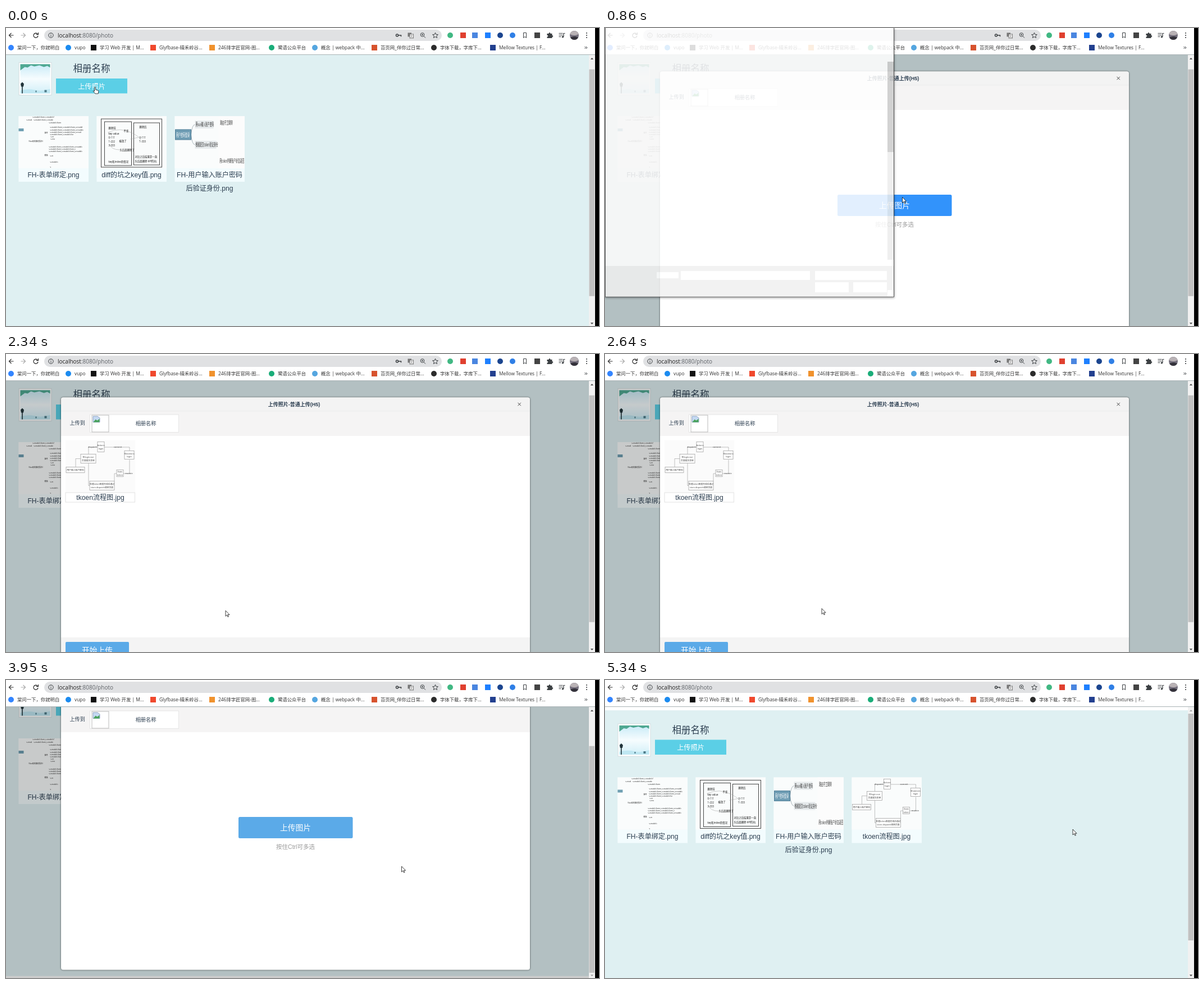
An HTML page for the animation above (5.41 s loop, 1056 by 531 pixels).

```html
<!DOCTYPE html>
<html lang="zh">
<head>
<meta charset="utf-8">
<title>相册上传</title>
<style>
html, body { margin: 0; width: 100%; height: 100%; overflow: hidden; background: #fff; }
svg { display: block; font-family: "Open Sans", "Noto Sans CJK SC", "Noto Sans CJK", sans-serif; }
.web { font-family: "Liberation Sans", "Noto Sans CJK SC", "Noto Sans CJK", sans-serif; }
.mid { text-anchor: middle; }
.end { text-anchor: end; }
.bold { font-weight: 700; }
</style>
</head>
<body>
<svg id="stage" width="1056" height="531" viewBox="0 0 1056 531"></svg>
<script>
const FRAME = 77.29, COUNT = 70, LOOP = 5410;
const INK = '#2c3e50';

// Drawing helpers; text is centred vertically on y
const R = (x, y, w, h, fill, more = '') => `<rect x="${x}" y="${y}" width="${w}" height="${h}" fill="${fill}" ${more}/>`;
const C = (x, y, r, fill, more = '') => `<circle cx="${x}" cy="${y}" r="${r}" fill="${fill}" ${more}/>`;
const P = (d, fill, more = '') => `<path d="${d}" fill="${fill}" ${more}/>`;
const L = (d, color = '#333', w = 1, more = '') => P(d, 'none', `stroke="${color}" stroke-width="${w}" ${more}`);
const T = (x, y, size, text, fill = '#222', cls = '') =>
  `<text x="${x}" y="${y + size * .37}" font-size="${size}" fill="${fill}" class="${cls}">${text}</text>`;
const G = (attrs, ...parts) => `<g ${attrs}>${parts.join('')}</g>`;
const at = (x, y, sx = 1, sy = sx) => `transform="translate(${x} ${y}) scale(${sx} ${sy})"`;
const line = (color, w = 1) => `stroke="${color}" stroke-width="${w}"`;
const chevron = (x, y, color = '#555') => L(`M${x - 2.5} ${y - 1.2}l2.5 2.5 2.5-2.5`, color, .9);
const next = (x, y) => L(`M${x} ${y - 2}l2 2-2 2`, '#555', .8);
const tri = (x, y, up, fill) => P(`M${x - 2.6} ${y + (up ? 1.5 : -1.5)}h5.2l-2.6 ${up ? -3 : 3}z`, fill);

/* ---------- pictures on the page ---------- */
function cover() {
  return G(at(22.5, 78), R(.5, 0, 58, 58, '#fff', line('#d3dde0')),
    R(3, 3, 53, 52, 'url(#sky)'),
    P('M3 3h53v6l-5-3-6 2-8-3-9 2-6-2-6 4-5-1-8 6z', '#4fa892'),
    P('M3 50q14-4 26-1t27-2v8H3z', '#bfe7f2'),
    R(5.7, 42, 1.6, 13, '#22343a'), P('M3.5 38l3-3 3 3-1 5h-4z', '#22343a'),
    R(30, 50, 2, 3, '#4d7a88'), R(46, 49, 4, 4, '#4d7a88'));
}

function codeShot() {
  const rows = [[25, 2, 22], [14, 7, 5], [27, 7, 19], [54, 12, 12], [56, 20, 33], [56, 25, 34], [56, 29, 31], [56, 33, 24],
    [57, 37, 3], [57, 41, 4], [54, 55, 34], [54, 59, 27], [54, 63, 34], [56, 71, 3], [56, 82, 8], [56, 91, 1]];
  return rows.map(([x, y, n]) => T(x, y, 3.3, 'v-model=form,'.repeat(3).slice(0, n), '#222')).join('') +
    R(0, 22, 9, 5, '#6f9fb2') + T(46, 30, 3, '事件', '#111') + T(18, 45, 3, '(Vue双向绑定指令)', '#111') + T(46, 70, 3, '修饰', '#111');
}

function diffShot() {
  const notes = [[21, 21, '删除前'], [48, 26, '不变'], [21, 31, 'key value'], [21, 38, '0-111'], [21, 45, '1-222'],
    [21, 52, '3-333'], [40, 44, '被改了'], [76, 19, '删除后'], [76, 38, '0-111'], [76, 45, '1-333'], [41, 60, '头后面删除了'],
    [68, 72, '对比之后结果是一直'], [68, 80, '头后面删除 diff的坑'], [21, 81, 'key和index的情况']];
  return R(8, 5, 108, 86, 'none', line('#333', .9)) + R(14, 10, 48, 78, 'none', line('#333', .9)) +
    R(66, 12, 46, 75, 'none', line('#333', .9)) + L('M20 29q22-10 43 1t12 14M23 50q3 10 18 10M60 41l14-3', '#999', .5) +
    notes.map(([x, y, t]) => T(x, y, 4.4, t, '#111')).join('');
}

function mindShot() {
  const tag = (x, y, t) => T(x, y, 9, t, '#333');
  return R(78, 0, 46, 93, '#fcfcfc') + R(36, 8, 33, 14, '#e6eaec') + R(36, 44, 38, 14, '#e6eaec') +
    L('M29 33q2-18 7-18M29 33q2 18 7 18', '#8b9aa2', .7) + R(1, 24, 28, 18, '#6f9db4', line('#4d7d96')) +
    G('transform="scale(.42 1)"', T(6, 33, 9.5, '用户密码登录', '#fff'), tag(88, 15, '用vue输入账户密码'),
      tag(88, 51, '根据提交token验证身份'), tag(192, 12, '路由守卫跳转'), tag(190, 80, '用token判断账户状态返回'));
}

function flowShot() {
  const box = (x, y, w, h, ...rows) => R(x, y, w, h, '#fdfdfd', line('#999', .7)) +
    rows.map((t, i) => T(x + w / 2, y + h / 2 + (i - (rows.length - 1) / 2) * 5.2, 3.8, t, '#444', 'mid')).join('');
  return L('M41 25V12.5H57M69 12.5H114V19M114 35V59.5H103M91 59.5H87V73M43 81H41V41M18 48V33H27', '#999', .6) +
    box(57, 3, 12, 18, 'Actions', 'login') + box(105, 19, 17, 15, 'Mutations', 'login') +
    box(27, 25, 27, 16, '在login.vue', '页面提交表单') + box(1, 48, 33, 10, '用户输入账户密码') +
    box(91, 53, 12, 12, 'State', 'token') + box(43, 73, 44, 16, '处理token数据完成后通过', 'store.dispatch跳转页面') +
    T(48, 12.5, 4, 'dispatch', '#444', 'mid') + T(93, 12.5, 4, 'commit', '#444', 'mid') + T(113, 59.5, 4, 'mutate', '#444', 'mid');
}

const card = (i, shot, ...names) => G(at(22.5 + i * 139, 173.5), R(0, 0, 124.5, 117, '#f3fcfe'), R(0, 0, 124.5, 93, '#fafcfc'), shot,
  names.map((t, k) => T(62, 105 + k * 24, 12.1, t, INK, 'web mid')).join(''));

function page() {
  return R(0, 0, 1038, 700, '#fff') + R(0, 54, 1038, 543, '#dff0f2') + cover() +
    T(152.5, 88.8, 16.5, '相册名称', INK, 'web mid') +
    R(89, 106.5, 127, 26.5, '#5bcfe6') + T(152.5, 120.5, 12.2, '上传照片', '#fff', 'web mid') +
    card(0, codeShot(), 'FH-表单绑定.png') + card(1, diffShot(), 'diff的坑之key值.png') +
    card(2, mindShot(), 'FH-用户输入账户密码', '后验证身份.png') +
    G('id="added"', card(3, flowShot(), 'tkoen流程图.jpg'));
}

function dialog() {
  return R(98, 94, 835, 492, '#fff', 'rx="4" style="filter:drop-shadow(0 0 1.5px #000a)"') +
    P('M98 118V98q0-4 4-4h827q4 0 4 4v20z', '#f3f3f3') + R(98, 118, 835, 44.5, '#f5f4f4') +
    L('M98 118.3H933', '#e8e8e8', .8) +
    T(513, 106, 9, '上传照片-普通上传(H5)', INK, 'web mid bold') + L('M911.5 103.3l5.4 5.4m0-5.4l-5.4 5.4', '#444', 1) +
    T(113.5, 139.5, 9.1, '上传到', INK, 'web') + R(149.5, 124.5, 158, 31.5, '#fff', line('#e6e6e6')) +
    R(153, 125.5, 30, 30, '#fff', line('#bbb')) +
    P('M155 127.5h8l4 3v7.5h-12z', '#c5d9f3', line('#8fa6c4')) + P('M155.5 138l4-5 3 2 4-3v6z', '#4aa35c') +
    T(249, 140, 9.2, '相册名称', INK, 'web mid') +
    G('id="pick"', R(414, 313.5, 203.5, 38, '#5baae8', 'rx="2.5" id="pickBtn"'),
      T(515.5, 332, 13.7, '上传图片', '#fff', 'web mid'), T(515.5, 366.3, 10.5, '按住Ctrl可多选', '#999', 'web mid')) +
    G('id="list"', G(at(106, 170), R(0, 0, 124, 93, '#fbfbfb'), flowShot(), R(0, 93.5, 123.5, 17, '#fff', line('#e2e2e2')),
      T(62, 102.5, 12.1, 'tkoen流程图.jpg', INK, 'web mid')),
      P('M98 521.5h835v60q0 4-4 4h-827q-4 0-4-4z', '#f4f4f4'),
      R(106, 529.5, 113, 30, '#5baae8', 'rx="2" id="sendBtn"'), T(162.5, 544.5, 13.7, '开始上传', '#fff', 'web mid'));
}

/* ---------- browser ---------- */
function chrome() {
  const marks = [[9, '棠问一下，你就明白', '#3385ff', 1], [111, 'vupo', '#1b8bf0', 1], [156, '学习 Web 开发 | M...', '#111', 0],
    [262, 'Glyfbase-晴禾岭谷...', '#f0492e', 0], [367, '246排字匠官网-图...', '#f0922e', 0], [473, '鹭语公众平台', '#1aad79', 1],
    [550, '概念 | webpack 中...', '#55a6e0', 1], [656, '苔页网_伴你过日常...', '#d7532e', 0], [762, '字体下载，字库下...', '#2b2b2b', 1],
    [867, 'Mellow Textures | F...', '#23408f', 0]];
  const logo = (x, y, r, fill, round) => round ? C(x, y, r, fill) : R(x - r, y - r, 2 * r, 2 * r, fill);
  const exts = [[791, '#41b883', 1], [814, '#e0402f', 0], [835, '#4a86e0', 0], [858, '#1e80ff', 0], [880, '#1b458f', 1], [902, '#2f7fe6', 1], [946, '#444', 0]];
  const dark = '#3c4043';
  return R(0, 0, 1049, 48, '#fff') + R(0, 47, 1049, 1, '#a9b3b5') + R(68, 3, 708, 20, '#e0e1e3', 'rx="10"') +
    L('M13.5 13H5.5m4-4l-4 4 4 4', '#333', 1.2) + L('M26.5 13h8m-4-4l4 4-4 4', '#aaa', 1.2) +
    L('M56 10.5a4 4 0 1 0 1 3.5M57.5 8v3.5h-3.5', '#333', 1.3) +
    C(80, 13, 4.2, 'none', line(dark)) + L('M80 12.5v3M80 10.2v1.2', dark, 1) +
    T(92, 13, 10, 'localhost<tspan fill="#5f6368">:8080/photo</tspan>') +
    C(696.5, 13, 2, 'none', line(dark, 1.5)) + L('M698.5 13h5v2.2', dark, 1.5) +
    R(715.5, 8.5, 6.5, 7, '#777') + R(719, 11, 6.5, 7, '#fff', line('#777')) + T(722.2, 14.5, 5, '文', '#666', 'mid') +
    C(741.5, 12, 3.3, 'none', line(dark)) + L('M744 14.5l3 3M740 12h3M741.5 10.5v3', dark, 1) +
    P('M764.5 8.3l1.4 3.2 3.5.3-2.7 2.3.9 3.4-3.1-1.8-3.1 1.8.9-3.4-2.7-2.3 3.5-.3z', 'none', line(dark)) +
    exts.map(([x, c, round]) => logo(x, 13, 5, c, round)).join('') +
    L('M921.5 8.5h5v9l-2.5-2-2.5 2z', dark, 1) +
    P('M963.5 10h3q0-2 1.5-2t1.5 2h3v3q1.8 0 1.8 1.5T972.5 16v2h-9v-2.5q1.8 0 1.8-1.3T963.5 13z', dark) +
    L('M984.5 9.5h7m-7 3h7m-7 3h4M993 9v6.5M993 9.5h2.5', dark, 1.2) + C(991.5, 15.7, 1.7, dark) +
    C(1012, 13, 8, '#75707e') + P('M1004.3 11a8 8 0 0 1 15.4 0q-8 4-15.4 0z', '#b9b2b5') + P('M1005 17q7-4 14 0a8 8 0 0 1-14 0z', '#34323b') +
    [9, 13, 17].map(y => C(1034, y, 1.1, dark)).join('') +
    marks.map(([x, t, c, round]) => logo(x, 35, 5, c, round) + T(x + 11, 35.3, 8.4, t, '#333')).join('') +
    L('M1030.5 33l2 2-2 2m2.5-4l2 2-2 2', dark, 1);
}

const scrollbar = () => R(1038, 48, 11, 483, '#f1f1f1') + G('id="upTri"', tri(1043.5, 54.5, true, 'currentColor')) +
  G('id="downTri"', tri(1043.5, 526.5, false, 'currentColor')) + R(1038.5, 60, 9.5, 404, '#c1c1c1', 'id="thumb"');

/* ---------- file window ---------- */
const col = i => 156 + 76.8 * i;
const label = (i, y, text) => text.split('|').map((t, k) => T(col(i), y + k * 11, 8.3, t, '#111', 'mid')).join('');
const shortcut = (x, y) => R(x, y, 11, 11, '#fff', line('#bbb', .5)) + L(`M${x + 2.5} ${y + 9}q0-5 5-5.5M${x + 5} ${y + 1.8}l3 1.7-2 3`, '#1c66b8', 1.5);

function folder(i, fill, extra) {
  return G(at(col(i) - 22, 52), P('M0 4L12 1l17 3v54L0 57z', '#f3cd62'), P('M8 7l36-2v50l-24 5z', fill, line('#ccc', .5)),
    extra, P('M0 4l9 6q7 4 7 11l2 41L0 56z', '#ffe08a'));
}

const zip = (x, y) => G(at(x, y), P('M0 3l17-3 31 4v56l-17 4L0 57z', '#ffe08a'), P('M20 2l28 3v55l-17 4z', '#f9d674'),
  R(27, 2, 6, 60, '#a8a8a8'), L('M30 3v58', '#666', 3, 'stroke-dasharray="1.5 1.5"'));

const mini = (x, y, w, h) => G(at(x, y), R(0, 0, w, h, '#fff', line('#ccc', .7)), G(at(0, 0, w / 124, h / 93), flowShot()));

function files() {
  const names = [[0, 122, 'vue'], [1, 122, '笔记'], [2, 122, '家常味代码'], [3, 122, '面试'], [4, 122, '2020-12-19-vue|06.zip'],
    [0, 217, '2020-13-vue01.z|ip'], [1, 217, 'Orvex|Shadebench|Vintage KT'], [2, 217, 'Orvex|Inkforge KT|2019'],
    [3, 217, 'FH-用户输入账户|密码后验证身份.|png'], [4, 217, 'NCrafter Q'], [0, 323, 'Halvoryne Brim'], [1, 323, 'Deskio'],
    [2, 323, 'tkoen流程图.jpg'], [3, 323, 'toke问题图.jpg'], [4, 323, 'vue.md'], [0, 407, 'KLQ 校园版'], [1, 407, 'VTwig 8 Update|4'],
    [2, 407, 'xx1aaa.gif'], [3, 407, '乐映禾'], [4, 407, '棠问网盘']];
  const apps = [[200, 143.5, 65, '#0b2230', 0], [277, 143.5, 65, '#001d2b', 0], [121.5, 248.5, 69, '#0078d7', 0], [198, 248.5, 69, '#404040', 0],
    [125, 334, 63, '#5b8def', 13], [200.5, 335, 64.5, '#e8262f', 5], [352, 333, 69, '#10c20c', 12]];
  const codeLines = [8, 14, 20, 26, 32, 38, 44].map((y, k) => R(22, y + 4, 9 + k % 3 * 4, 1, '#8a93a8')).join('');
  return R(350, 141, 74, 105, '#e5f3ff', 'id="hover"') + R(273, 247.5, 74, 82.5, '#cce8ff', 'id="chosen" stroke="#99d1ff" stroke-width=".8"') +
    folder(0, '#272733', codeLines) + folder(1, '#f7f7f7', R(22, 26, 15, 15, '#777')) +
    folder(2, '#f5f6f8', R(24, 14, 15, 1.5, '#aaa') + R(31, 31, 10, 17, '#4d7fc0')) + folder(3, '#fafafa', R(20, 14, 20, 2, '#d77') + R(21, 27, 19, 9, '#e6efe8') + R(24, 40, 14, 2, '#d77')) +
    zip(441.5, 50) + zip(133.5, 145) +
    apps.map(([x, y, s, c, rx]) => R(x, y, s, s, c, `rx="${rx}"`)).join('') +
    R(429.5, 143, 68, 68, '#fff', line('#ddd')) + R(449, 160, 29, 29, '#1fa348') +
    R(430, 333, 67, 67, '#fff', 'rx="13" stroke="#eee"') + C(463.5, 367, 22, '#3d9df2') +
    [[200, 199], [277, 199], [430, 199], [122, 306], [199, 306], [122, 390], [200, 390], [353, 390], [430, 390]].map(p => shortcut(...p)).join('') +
    G(at(355, 195), R(0, 0, 63, 14, '#fff', line('#ccc', .7)), R(2, 5, 11, 3, '#6f9db4'), R(18, 3, 22, 1.5, '#aaa'), R(18, 9, 26, 1.5, '#aaa')) +
    mini(278, 283, 64, 32) + mini(355, 291, 63, 24) +
    P('M436 255l40-5 16 10 0 51-48 5z', '#fff', line('#ccc', .8)) + R(452, 272, 24, 24, '#707070', 'transform="rotate(-7 464 284)"') +
    G(at(278, 376), R(0, 0, 63, 22, '#fff', line('#ccc', .7)), R(22, 9, 14, 1, '#aaa'), R(28, 14, 9, 3, '#6cba83'), R(0, 2, 63, 1, '#ddd')) +
    names.map(n => label(...n)).join('');
}

function sidebar() {
  const rows = [[89, 'VeloStow', 'o#0a74d4'], [105.5, 'StowPad 上传', 'f'], [122, '附件', 'f'], [138.5, '图片', 'f'], [155, '文档', 'f'], [177, 'KLQ网盘', 'o#4a90e2'],
    [199.5, '此电脑', 'p'], [216, '3D 对象', 's#35a5d6'], [232, '视频', 's#555d66'], [248.5, '图片', 's#5a9ec9'], [265, '文档', 's#a5aeb5'], [281.5, '下载', 'd'],
    [298, '音乐', 'n'], [314.5, '桌面', 's#1e90dc'], [331, 'Nor10 (C:)', 'h'], [347.5, '新加卷 (D:)', 'h'], [364, '新加卷 (E:)', 'h'], [380.5, '新加卷 (F:)', 'h'],
    [397, '新加卷 (G:)', 'h'], [419, '网络', 'p']];
  const icon = {
    o: (y, c) => C(20.5, y, 4.5, c),
    f: y => R(22.5, y - 4.5, 6.5, 9, '#f7cf63') + R(27, y - 3, 2.5, 7.5, '#ffe699'),
    p: y => R(17, y - 4, 9, 6, '#3a9bdc') + R(19, y + 3, 6, 1.2, '#777'),
    s: (y, c) => R(21.5, y - 4, 10, 8, c) + R(23.5, y - 2, 6, 3.5, '#fff', 'opacity=".5"'),
    d: y => L(`M26.5 ${y - 4.5}v6`, '#2b80d0', 3) + P(`M22 ${y}h9l-4.5 5z`, '#2b80d0'),
    n: y => L(`M26 ${y + 3}v-7q1 3 3.5 3.5`, '#1e90dc', 1.4) + C(24.5, y + 3, 2, '#1e90dc'),
    h: y => R(21.5, y, 10, 3, '#8a8f94') + P(`M21.5 ${y}l2-2h6l2 2z`, '#c5c9cc')
  };
  const nested = 'fsdnh';
  return R(0, 306, 95, 16.5, '#d9d9d9') + P('M21 62l1.4 3.3 3.6.3-2.8 2.3.9 3.5-3.1-1.9-3.1 1.9.9-3.5-2.8-2.3 3.6-.3z', '#2d84d0') + T(29, 67, 8.3, '快速访问') +
    rows.map(([y, t, kind]) => icon[kind[0]](y, kind.slice(1)) + T(nested.includes(kind[0]) ? 34.5 : 29, y, 8.3, t)).join('');
}

function fileWindow() {
  const bar = (x, y, h) => R(x, 49, 11, 377, '#f0f0f0') + R(x, y, 11, h, '#cdcdcd') + L(`M${x + 3} 55l2.5-2.5 2.5 2.5M${x + 3} 418.5l2.5 2.5 2.5-2.5`, '#555', 1);
  return R(.5, -.5, 516, 482, '#fff', 'stroke="#777" style="filter:drop-shadow(0 1px 2px #0006)"') +
    L('M16.5 12.5h-8m3-3l-3 3 3 3M26 12.5h8m-3-3l3 3-3 3', '#ccc', 1) + chevron(49, 12.5, '#bbb') + L('M64 17V9m-3 3l3-3 3 3', '#555', 1.2) +
    R(70.5, 1, 270, 21, '#fff', line('#d9d9d9')) + R(341, 1, 23.5, 21, '#fff', line('#d9d9d9')) + R(370.5, 1, 139, 21, '#fff', line('#d9d9d9')) +
    R(75, 8, 10.5, 7.5, '#1e90dc') + next(90, 12) + T(98, 12, 8.5, '此电脑') + next(130, 12) + T(138, 12, 8.5, '桌面') + next(161.5, 12) +
    chevron(329.5, 12.5) + L('M355 10a3.5 3.5 0 1 0 .8 3M355.5 8v2.5h-2.5', '#444', 1) +
    C(385.5, 11, 2.7, 'none', line('#555')) + L('M383.5 13l-3 3', '#555', 1) + T(398, 12, 8.5, '搜索"桌面"', '#666') +
    R(1, 25, 515, 24, '#f5f6f7') + T(11, 37, 8.4, '组织') + tri(32.5, 37, false, '#333') + T(54.5, 37, 8.4, '新建文件夹') +
    R(433, 33, 9.5, 8, '#fff', line('#8ca0b0')) + R(435, 36, 6, 4, '#3f8fd0') + tri(452, 37, false, '#333') +
    R(470.5, 33, 9.5, 8, '#fff', line('#4a6a80')) + R(476, 33, 4, 8, '#4aa0dd') + C(500.5, 37, 5.5, '#0a64ad') + T(500.5, 37, 8, '?', '#fff', 'mid bold') +
    sidebar() + bar(95, 60, 350) + bar(505, 104, 162) + G('id="files"', files()) +
    R(1, 426, 515, 55, '#f0f0f0') + T(130, 442.5, 8.3, '文件名(N):', '#111', 'end') + R(134.5, 435, 231.5, 15.5, '#fff', line('#7a7a7a')) + chevron(361, 442.5) +
    G('id="fileName"', T(137, 442.5, 8.6, 'tkoen流程图.jpg', '#111')) +
    R(375, 435, 128.5, 15.5, '#e1e1e1', 'id="combo" stroke="#adadad"') + T(377, 442.5, 8.3, '所有文件 (*.*)', '#111') + chevron(498, 442.5) +
    R(375.7, 455.7, 58.5, 16, '#e1e1e1', line('#0078d7', 1.4)) + T(405, 464, 8.4, '打开(O)', '#111', 'mid') +
    R(444, 455.7, 59, 16, '#e1e1e1', line('#adadad')) + T(473.5, 464, 8.4, '取消', '#111', 'mid') + L('M509 480l6-6m-3 6l3-3', '#aaa', 1);
}

const ghost = () => R(.5, -.5, 514, 479.5, '#fff', 'stroke="#333" style="filter:drop-shadow(0 1px 2px #0008)"') +
  R(503, 60, 11, 353, '#ededed') + R(503, 60, 11, 161, '#ccc') + R(1, 424, 513, 54.5, '#f0f0f0') +
  R(92, 435, 39, 11, '#fff') + R(135, 433, 230, 16, '#fff') + R(374, 433, 128, 16, '#fff') + R(374, 453, 60, 18, '#fff') + R(442, 453, 60, 18, '#fff') + R(503, 467, 11, 11, '#fff');

const arrow = P('M0 0v10l2.4-2.2 1.6 3.5 1.5-.7-1.6-3.3h3.2z', '#fff', line('#111', .8));
const hand = P('M2 6V1.2q0-1.2 1-1.2t1 1.2V5l4.5 1.2q1 .4.9 1.5L8.7 12H3.5L.2 8.3q-.6-.9.1-1.3T2 8z', '#fff', line('#111', .8));

const $ = id => document.getElementById(id);
$('stage').innerHTML = `<defs>
  <linearGradient id="sky" x2="0" y2="1"><stop stop-color="#c9ebf7"/><stop offset=".5" stop-color="#f6fcfe"/><stop offset="1" stop-color="#d2eff8"/></linearGradient>
  <clipPath id="view"><rect y="48" width="1038" height="483"/></clipPath></defs>` +
  G('clip-path="url(#view)"', G('id="page"', page()), R(0, 48, 1038, 483, '#000', 'id="shade" opacity=".2"'), G('id="dialog"', dialog())) +
  scrollbar() + chrome() + R(1049, 0, 7, 531, '#000') + G('id="ghost" opacity=".86"', ghost()) + G('id="win"', fileWindow()) +
  C(0, 0, 8.5, '#ffec1a', 'id="press" opacity=".75"') + G('id="arrow"', arrow) + G('id="hand"', hand);

/* ---------- motion ---------- */
// step, x, y
const pointer = [[0, 155.5, 105], [1, 155.5, 105], [5, 529.5, 301.5], [12, 529.5, 301.5], [14, 390, 190], [16, 308, 289], [18, 308, 289],
  [21, 403, 448], [24, 403, 448], [26, 398, 461], [28, 396, 461], [32, 386, 453.5], [35, 386, 453.5], [41, 163, 470], [45, 163, 470],
  [51, 704.5, 332], [54, 790, 240], [59, 913.5, 106.5], [63, 913.5, 106.5], [69, 833, 266]];
const scroll = [[0, 16.5], [37, 16.5], [41, 69.5], [51, 69.5], [54, 0], [69, 0]];
const presses = [[1, 2], [8, 10], [16, 17], [26, 27], [43, 45], [61, 62]];

function track(keys, n) {
  const i = Math.max(1, keys.findIndex(k => k[0] >= n));
  const a = keys[i - 1], b = keys[i], p = (n - a[0]) / (b[0] - a[0]);
  return a.slice(1).map((v, k) => v + (b[k + 1] - v) * p);
}
const within = (n, a, b) => n >= a && n < b;
const show = (id, on) => $(id).setAttribute('visibility', on ? 'inherit' : 'hidden');
const move = (id, x, y) => $(id).setAttribute('transform', `translate(${x} ${y})`);
const paint = (id, fill) => $(id).setAttribute('fill', fill);

function render(n) {
  const [s] = track(scroll, n), [x, y] = track(pointer, n);
  const open = within(n, 2, 62), queued = within(n, 28, 45), pointing = n < 2 || within(n, 59, 63);
  move('page', 0, -s);
  move('dialog', 0, -s);
  move('thumb', 0, s * .83);
  $('upTri').style.color = s < 1 ? '#a3a3a3' : '#505050';
  $('downTri').style.color = s > 69 ? '#a3a3a3' : '#505050';
  show('shade', open);
  show('dialog', open);
  show('added', n >= 62);
  show('pick', !queued);
  show('list', queued);
  // a child's own visibility would override a hidden dialog, so both are combined here
  if (!open) { show('pick', false); show('list', false); }
  paint('pickBtn', within(n, 5, 28) ? '#3293fb' : '#5baae8');
  paint('sendBtn', within(n, 41, 45) ? '#3293fb' : '#5baae8');
  show('ghost', n === 11);
  const picking = within(n, 12, 28);
  show('win', picking);
  $('win').setAttribute('opacity', n === 27 ? .5 : 1);
  show('files', picking && n >= 13);
  show('hover', n === 14);
  show('chosen', picking && n >= 16);
  show('fileName', picking && n >= 16);
  paint('combo', within(n, 21, 25) ? '#dbe7f0' : '#e1e1e1');
  show('press', presses.some(([a, b]) => within(n, a, b)));
  move('press', x + 1, y + 1);
  show('hand', pointing);
  show('arrow', !pointing);
  move('hand', x, y);
  move('arrow', x, y);
}

let last = -1;
function tick() {
  const n = Math.min(COUNT - 1, Math.floor((performance.now() % LOOP + 8) / FRAME));
  if (n !== last) render(last = n);
  requestAnimationFrame(tick);
}
tick();
</script>
</body>
</html>
```
